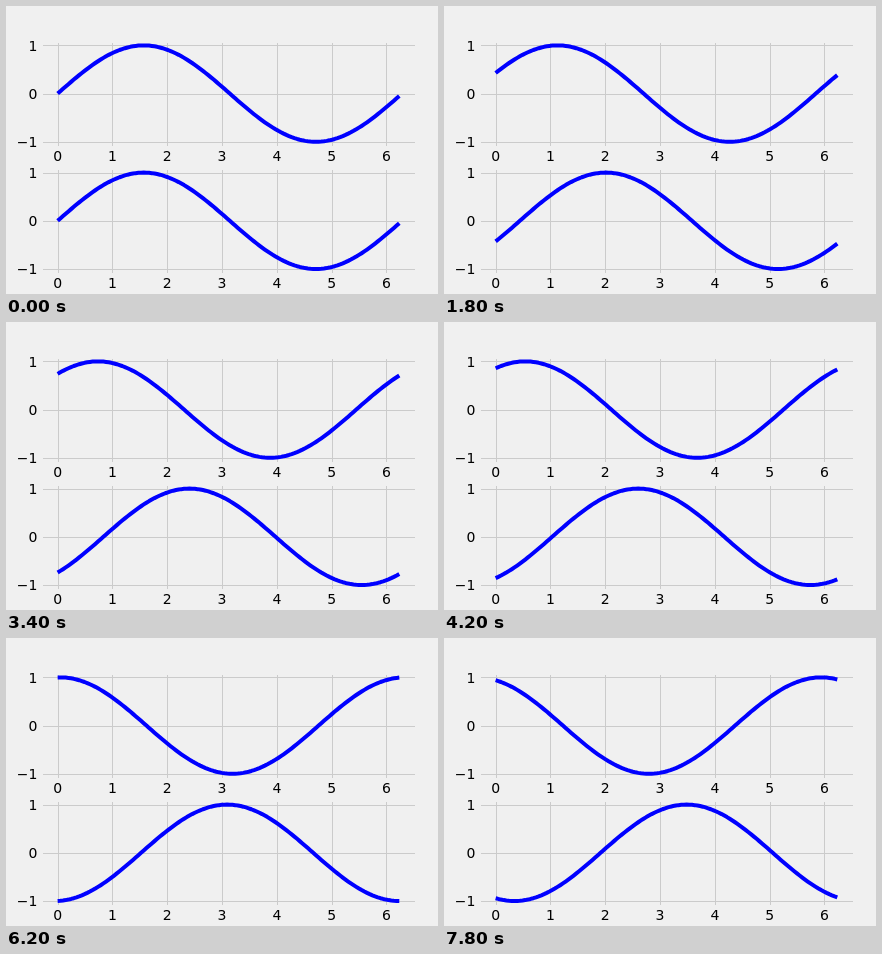
Animation of 432x288 px, one loop 8 s. Source, as an HTML page with a canvas:

```html
<!DOCTYPE html>
<html lang="en">
<head>
<meta charset="utf-8">
<title>Two travelling sine waves</title>
<style>
  html, body { margin: 0; width: 100%; height: 100%; overflow: hidden; background: #f0f0f0; }
  canvas { display: block; }
</style>
</head>
<body>
<canvas id="stage" width="432" height="288"></canvas>
<script>
const ctx = document.getElementById('stage').getContext('2d');
const SAMPLES = 128, STEP = 2 * Math.PI / SAMPLES;
const STEP_MS = 200, LOOP_MS = 8000;
const LEFT = 51.64, UNIT_X = 54.806, UNIT_Y = 48.2;

// direction: +1 shifts the wave to the left, -1 to the right
const plots = [
  { middle: 87.58, top: 37, bottom: 140, xLabelY: 155, direction: 1 },
  { middle: 214.82, top: 164, bottom: 267, xLabelY: 282, direction: -1 },
];

const toX = x => LEFT + x * UNIT_X;
const snap = v => Math.round(v);

function drawAxes({ middle, top, bottom, xLabelY }) {
  ctx.font = '14px "DejaVu Sans", sans-serif';
  for (let x = 0; x <= 6; x++) {
    ctx.fillStyle = '#cbcbcb';
    ctx.fillRect(snap(toX(x)), top, 1, bottom - top);
    ctx.fillStyle = '#000';
    ctx.textAlign = 'center';
    ctx.fillText(x, toX(x), xLabelY);
  }
  for (let y = -1; y <= 1; y++) {
    const py = middle - y * UNIT_Y;
    ctx.fillStyle = '#cbcbcb';
    ctx.fillRect(37, snap(py), 372, 1);
    ctx.fillStyle = '#000';
    ctx.textAlign = 'right';
    ctx.fillText(y < 0 ? '\u22121' : y, 31.5, snap(py + 5.4));
  }
}

function drawWave({ middle, direction }, step) {
  ctx.beginPath();
  for (let i = 0; i < SAMPLES; i++) {
    const y = Math.sin((i + direction * step) * STEP);
    ctx.lineTo(toX(i * STEP), middle - y * UNIT_Y);
  }
  ctx.strokeStyle = '#00f';
  ctx.lineWidth = 4;
  ctx.lineJoin = 'round';
  ctx.stroke();
}

function render() {
  const step = Math.floor(performance.now() % LOOP_MS / STEP_MS);
  ctx.fillStyle = '#f0f0f0';
  ctx.fillRect(0, 0, 432, 288);
  for (const plot of plots) {
    drawAxes(plot);
    drawWave(plot, step);
  }
  requestAnimationFrame(render);
}
render();
</script>
</body>
</html>
```
